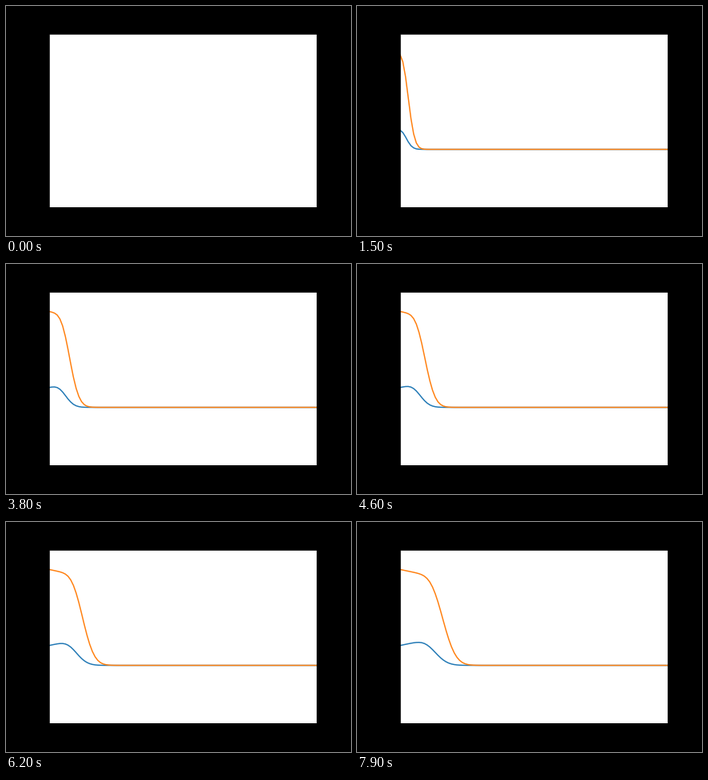
A matplotlib script for the animation above (8 s loop, 432x288 px).

```python
import numpy as np
import matplotlib.pyplot as plt
from matplotlib.animation import FuncAnimation

W, H, DPI = 432, 288, 72
FRAMES, INTERVAL = 80, 100
NODES = 100
WARM_UP = 4                     # steps done before the first curve appears
COURANT, DECAY = 0.2, 0.0012
RETARD = 1.25                   # slower transport of the daughter species
PARENT_IN, DAUGHTER_IN = 5 / 6, 1 / 6


def advect(c, inlet):
    """Change of c by upwind advection over one time step."""
    return COURANT * (np.concatenate(([inlet], c[:-1])) - c)


def simulate(steps):
    parent, daughter = np.zeros(NODES), np.zeros(NODES)
    history = [(parent, daughter)]
    for _ in range(steps):
        lost = DECAY * parent
        moved = advect(daughter, DAUGHTER_IN)
        parent = parent + advect(parent, PARENT_IN) - lost
        daughter = daughter + (moved + lost) / RETARD
        history.append((parent, daughter))
    return history


history = simulate(FRAMES + WARM_UP)
x = np.linspace(0, 1, NODES)

fig, ax = plt.subplots(figsize=(W / DPI, H / DPI), dpi=DPI, facecolor="black")
fig.subplots_adjust(left=0.125, right=0.9, bottom=0.125, top=0.88)
ax.set(xlim=(0, 1), ylim=(-0.5, 1), xticks=[], yticks=[])

daughter_line, = ax.plot([], [], color="C0", lw=1.5)
parent_line, = ax.plot([], [], color="C1", lw=1.5)


def draw(frame):
    if frame == 0:
        parent_line.set_data([], [])
        daughter_line.set_data([], [])
    else:
        parent, daughter = history[frame + WARM_UP]
        parent_line.set_data(x, parent)
        daughter_line.set_data(x, daughter)
    return daughter_line, parent_line


anim = FuncAnimation(fig, draw, frames=FRAMES, interval=INTERVAL,
                     repeat=True, repeat_delay=0)
plt.show()
```
